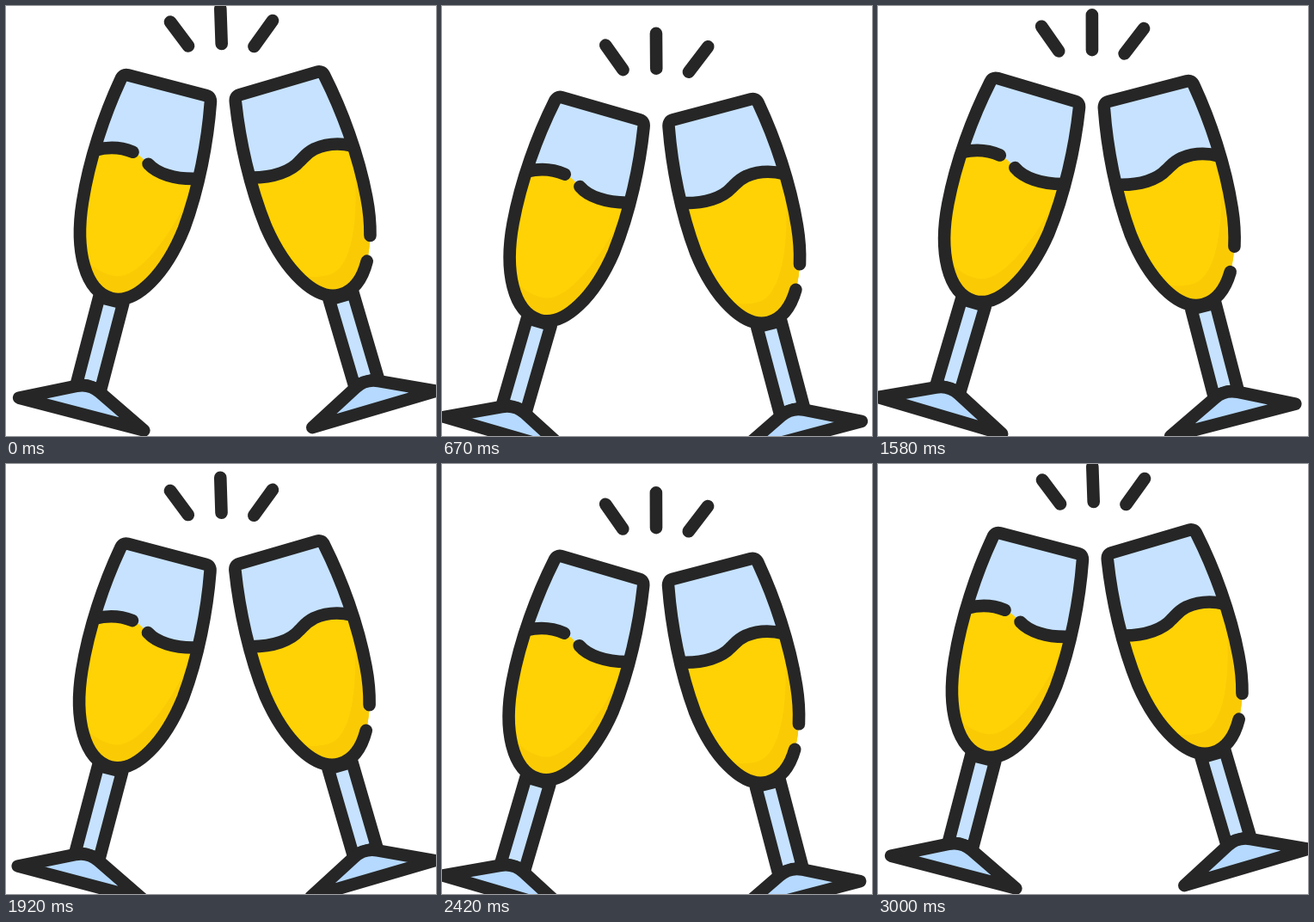
These frames come from a looping animation (500 by 500 pixels, 3080 ms). An HTML page:

```html
<!DOCTYPE html>
<html lang="en">
<head>
<meta charset="utf-8">
<title>Clinking glasses</title>
<style>
  html, body { margin: 0; width: 100%; height: 100%; overflow: hidden; background: #fff; }
  svg { display: block; width: 100%; height: 100%; }
  .ink { fill: none; stroke: #262626; stroke-width: 14.6; stroke-linecap: round; stroke-linejoin: round; }
  .glass { fill: #c6e2ff; }
  .foot { fill: #b5d9ff; }
  .wine { fill: #ffd205; }
  .shade { fill: #facb05; }
</style>
</head>
<body>
<svg viewBox="0 0 500 500">
  <defs>
    <path id="bowl" d="M-47-256H47Q53-256 54-249C62-205 66-150 61-100C54-45 30 0 0 0C-32 0-55.5-43-61-100C-66-150-62-205-54-249Q-53-256-47-256Z"/>
    <path id="wine" d="M-62-162C-48-170-34-173-19-171C-8-169-4-165 2-162C14-154 36-152 62-160L61-100C54-45 30 0 0 0C-32 0-55.5-43-61-100Z"/>
    <path id="shade" d="M62-165C54-105 28-25-6-26C-20-26-32-30-44-38L-30 5H70Z"/>
    <clipPath id="inWine"><use href="#wine"/></clipPath>
    <g id="base">
      <path class="ink glass" d="M-14.5 2V106H14.5V2Z"/>
      <path class="ink foot" d="M-75 139L-14 109Q0 102 14 109L75 139Z"/>
      <use href="#bowl" class="glass"/>
      <use href="#wine" class="wine"/>
    </g>
  </defs>
  <g id="scene">
    <path class="ink" d="M191 18.5L212 46.5M249.3 3.2L250.7 44M310 17L288.5 47"/>
    <g transform="translate(122.8 340) rotate(14.6)">
      <use href="#base"/>
      <g clip-path="url(#inWine)"><use href="#shade" class="shade"/></g>
      <use href="#bowl" class="ink"/>
      <path class="ink" d="M-62-162C-48-170-34-173-19-171M2-162C14-154 36-152 62-160"/>
    </g>
    <g transform="translate(389 335.5) rotate(-16.4) scale(-1 1)">
      <use href="#base"/>
      <g clip-path="url(#inWine)"><use href="#shade" class="shade" transform="scale(-1 1)"/></g>
      <path class="ink" d="M-52.4-56C-56.5-69.2-59.5-84-61-100C-66-150-62-205-54-249Q-53-256-47-256H47Q53-256 54-249C62-205 66-150 61-100C54-45 30 0 0 0C-16 0-29.9-10.75-40.4-28.6"/>
      <path class="ink" d="M-62-162C-48-170-34-173-19-171C-8-169-4-165 2-162C14-154 36-152 62-160"/>
    </g>
  </g>
</svg>
<script>
  const LOOP = 3080, STEPS = 37;
  const scene = document.getElementById('scene');
  const stepStart = k => Math.round(k * 25 / 3) * 10;

  function stepAt(t) {
    let k = 0;
    while (k < STEPS - 1 && stepStart(k + 1) <= t) k++;
    return k;
  }

  // Three tilts and two bobs per loop, each with a slight lag.
  function pose(k) {
    const tilt = 2 * Math.PI * k / 12;
    const bob = 2 * Math.PI * k / 18;
    const swing = (1 - Math.cos(tilt)) / 2;
    const angle = 1.93 * swing - 0.1 * Math.sin(tilt);
    const y = 12.2 * (1 - Math.cos(bob)) - 2.2 * Math.sin(bob) + 7.7 * swing;
    return `translate(0 ${y.toFixed(2)}) rotate(${angle.toFixed(3)} 250 -10)`;
  }

  const begin = performance.now();
  function draw() {
    const t = (performance.now() - begin) % LOOP;
    scene.setAttribute('transform', pose(stepAt(t)));
    requestAnimationFrame(draw);
  }
  draw();
</script>
</body>
</html>
```
